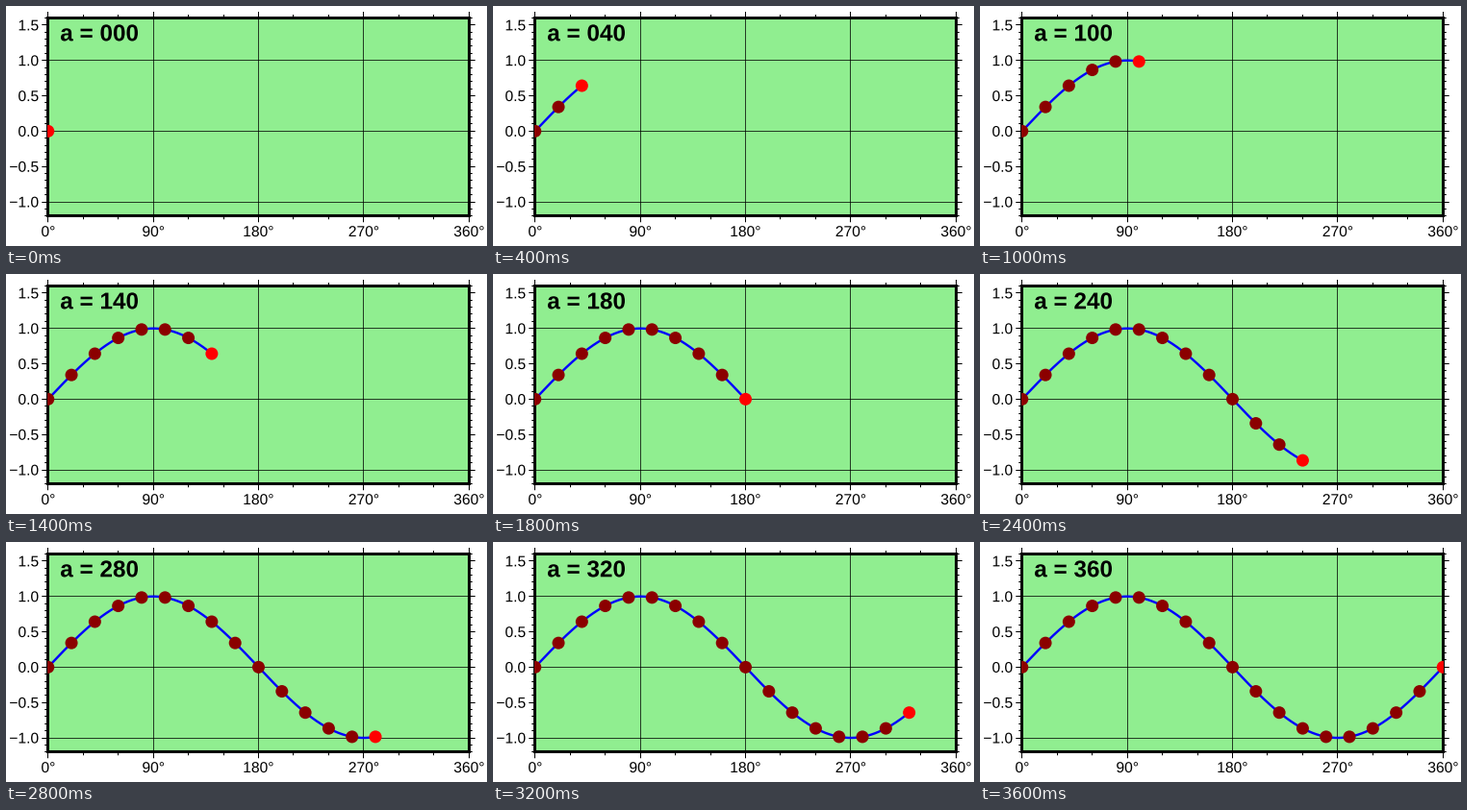
Recreate the animation shown at these times as a matplotlib script. Size 500x250 px, loop 3.8 s.

```python
import math
import numpy as np
import matplotlib.pyplot as plt
from matplotlib.animation import FuncAnimation
from matplotlib.patches import Circle, PathPatch, Rectangle
from matplotlib.textpath import TextPath
from matplotlib.transforms import Affine2D

W, H, DPI = 500, 250, 100
LEFT, RIGHT, TOP, BOTTOM = 43.75, 481.25, 12.5, 218.75
Y_MIN, Y_MAX = -1.2, 1.6
STEP, FRAMES, INTERVAL = 20, 19, 200
RADIUS = 6.5
MAJOR, MINOR = 6.5, 3.5


def pt(px):
    return px * 72 / DPI


def mid(v):
    """Centre of the pixel that holds v."""
    return math.floor(v) + 0.5


def px_x(deg):
    return LEFT + (RIGHT - LEFT) * deg / 360


def px_y(val):
    return TOP + (BOTTOM - TOP) * (Y_MAX - val) / (Y_MAX - Y_MIN)


def wave(deg):
    return px_y(np.sin(np.radians(deg)))


fig = plt.figure(figsize=(W / DPI, H / DPI), dpi=DPI, facecolor="white")
ax = fig.add_axes([0, 0, 1, 1])
ax.set_xlim(0, W)
ax.set_ylim(H, 0)
ax.axis("off")


def hairline(xs, ys, alpha=1):
    ax.plot(xs, ys, color="black", lw=pt(1), alpha=alpha, snap=False,
            solid_capstyle="butt", zorder=2)


def vline(x, y0, y1, alpha=1):
    hairline([mid(x)] * 2, [y0, y1], alpha)


def hline(y, x0, x1, alpha=1):
    hairline([x0, x1], [mid(y)] * 2, alpha)


def glyphs(text, size, weight="normal"):
    font = {"family": "Liberation Sans", "weight": weight}
    return TextPath((0, 0), text, size=size, prop=font)


def add_text(path, x, y):
    flip = Affine2D().scale(1, -1).translate(x, y)
    patch = PathPatch(path, fc="black", ec="none", snap=False, zorder=6,
                      transform=flip + ax.transData)
    return ax.add_patch(patch)


def label(x, y, text, anchor):
    """Place text so that the given share of its ink lies left of x."""
    path = glyphs(text, 15.6)
    box = path.get_extents()
    add_text(path, x - box.x0 - anchor * box.width, y)


ax.add_patch(Rectangle((LEFT, TOP), RIGHT - LEFT, BOTTOM - TOP,
                       fc="lightgreen", ec="none", zorder=1))
ax.add_patch(Rectangle((mid(LEFT), mid(TOP)), mid(RIGHT) - mid(LEFT),
                       mid(BOTTOM) - mid(TOP), fc="none", ec="black",
                       lw=pt(3), joinstyle="miter", snap=False, zorder=3))

# Grid
for deg in (90, 180, 270):
    vline(px_x(deg), TOP, BOTTOM, 0.75)
for val in (-1, 0, 1):
    hline(px_y(val), LEFT, RIGHT, 0.75)

# Ticks and labels
for deg in range(0, 361, 30):
    major = deg % 90 == 0
    size = MAJOR if major else MINOR
    x = px_x(deg)
    vline(x, BOTTOM, BOTTOM + size)
    vline(x, TOP - size, TOP)
    if major:
        label(x, 240, f"{deg}°", 0.5)
for tenth in range(-12, 17):
    major = tenth % 5 == 0
    size = MAJOR if major else MINOR
    y = px_y(tenth / 10)
    hline(y, LEFT - size, LEFT)
    hline(y, RIGHT, RIGHT + size)
    if major:
        label(33.5, y + 5.5, f"{tenth / 10:.1f}".replace("-", "−"), 1)

x0, y0 = math.floor(LEFT), math.floor(TOP)
clip = Rectangle((x0, y0), math.ceil(RIGHT) - x0, math.ceil(BOTTOM) - y0,
                 transform=ax.transData)
curve, = ax.plot([], [], color="blue", lw=pt(2.4), zorder=4)
curve.set_clip_path(clip)

dots = []
for i in range(FRAMES):
    dot = Circle((px_x(i * STEP), wave(i * STEP)), RADIUS, ec="none", zorder=5)
    ax.add_patch(dot)
    dot.set_clip_path(clip)
    dots.append(dot)

titles = [glyphs(f"a = {i * STEP:03d}", 24.3, "bold") for i in range(FRAMES)]
title = add_text(titles[0], 56.25, 36.3)


def update(n):
    degs = np.linspace(0, n * STEP, 4 * n * STEP + 1)
    curve.set_data(px_x(degs), wave(degs))
    for i, dot in enumerate(dots):
        dot.set_visible(i <= n)
        dot.set_facecolor("red" if i == n else "darkred")
    title.set_path(titles[n])
    return [curve, title, *dots]


anim = FuncAnimation(fig, update, frames=FRAMES, interval=INTERVAL,
                     repeat=True, repeat_delay=0, blit=False)
plt.show()
```
